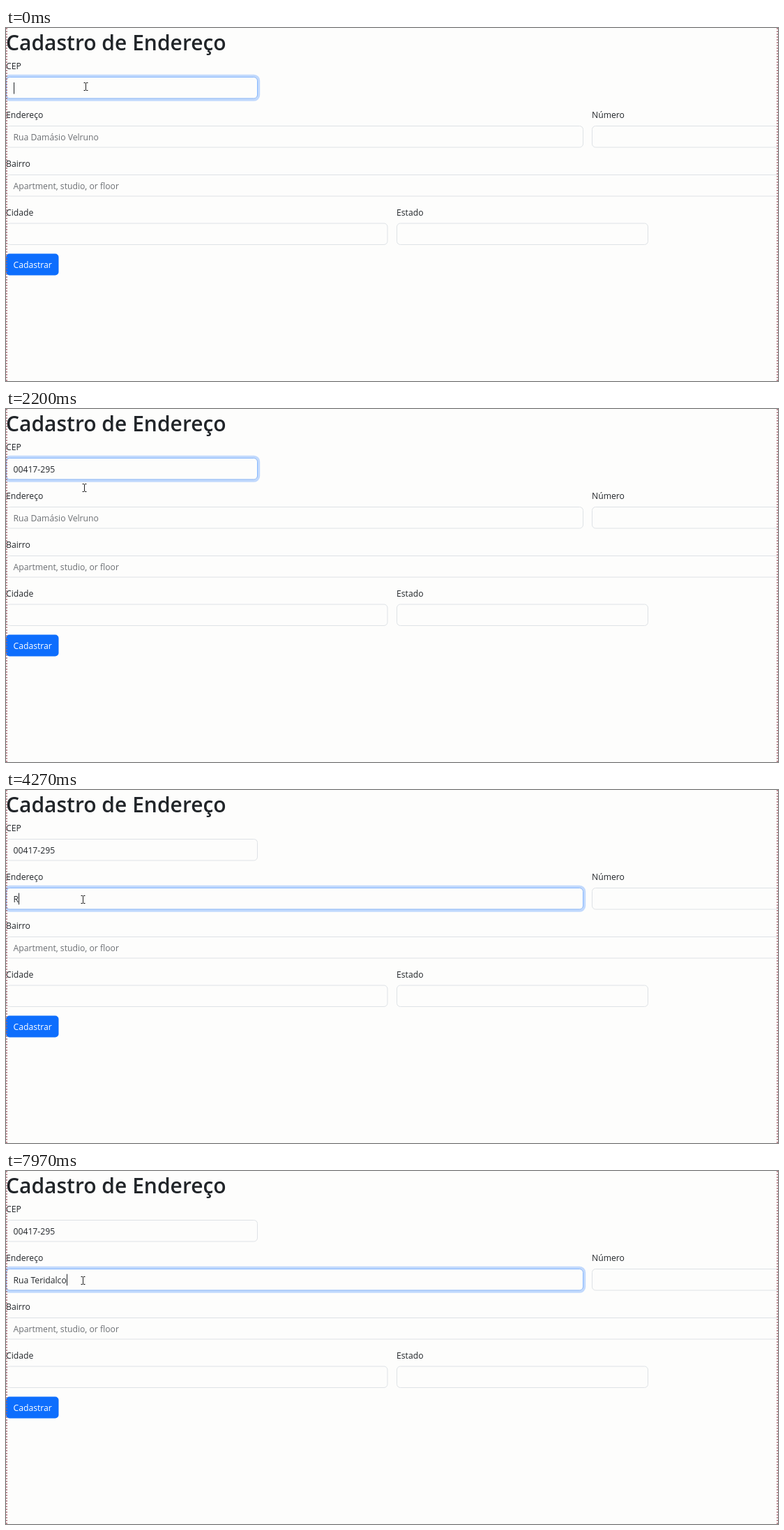
An HTML page that plays this animation: 1107 px wide and 506 px high, repeating every 8000 ms.

```html
<!DOCTYPE html>
<html lang="pt-BR">
<head>
<meta charset="utf-8">
<title>Cadastro de Endereço</title>
<style>
  html, body { margin: 0; width: 100%; height: 100%; overflow: hidden; background: #fdfdfc; }
  svg { display: block; }
  text { font: 12.2px "Open Sans", "Noto Sans", sans-serif; fill: #212529; white-space: pre; }
  .title { font-size: 30px; font-weight: 600; }
  .hint { fill: #6c6f73; }
  .field { fill: none; stroke: #dee2e6; }
  .focus { fill: none; stroke: #86b7fe; }
  .ring { fill: none; stroke: #0d6efd; stroke-opacity: .25; stroke-width: 3.2; }
  .edge { stroke: #a5606c; stroke-width: 1.4; stroke-dasharray: 2 2; }
</style>
</head>
<body>
<svg id="stage" width="1107" height="506" viewBox="0 0 1107 506"></svg>
<script>
const LOOP = 8000, CLICK = 2770, FADE = 150, BLINK = 500;
const stage = document.getElementById("stage");

function add(tag, attrs, parent = stage) {
  const el = document.createElementNS("http://www.w3.org/2000/svg", tag);
  for (const key in attrs) el.setAttribute(key, attrs[key]);
  return parent.appendChild(el);
}

function label(x, y, words, cls = "") {
  const el = add("text", { x, y, class: cls });
  el.textContent = words;
  return el;
}

function field(x, y, width, name) {
  label(x ? x - .5 : 0, y - 11.5, name);
  add("rect", { x: x || .5, y, width, height: 30.5, rx: 5, class: "field" });
}

function focusRing(y, width) {
  const group = add("g", {});
  add("rect", { x: -1.6, y: y - 2.1, width: width + 4.2, height: 34.7, rx: 7, class: "ring" }, group);
  add("rect", { x: .5, y, width, height: 30.5, rx: 5, class: "focus" }, group);
  return group;
}

label(0, 31.5, "Cadastro de Endereço", "title");
field(0, 70.5, 360, "CEP");
field(0, 140.5, 827, "Endereço");
field(840.5, 140.5, 273, "Número");
field(0, 210.5, 1113, "Bairro");
field(0, 280, 546.5, "Cidade");
field(560.5, 280, 360, "Estado");
label(10.5, 230.5, "Apartment, studio, or floor", "hint");

add("rect", { x: 0, y: 323.5, width: 75.5, height: 31, rx: 5, fill: "#0d6efd" });
label(10.5, 343.8, "Cadastrar").style.fill = "#fff";

const rings = [focusRing(70.5, 360), focusRing(140.5, 827)];
const hint = label(10.5, 160.5, "Rua Damásio Velruno", "hint");

// Each input types one character at each of its key times.
const inputs = [
  { text: "00417-295", y: 90.8, keys: [280, 420, 560, 700, 840, 990, 1130, 1270, 1410] },
  { text: "Rua Teridalco", y: 160.5,
    keys: [4150, 4280, 4410, 4560, 6080, 6280, 6480, 6680, 7000, 7200, 7400, 7600, 7830] }
];
for (const input of inputs) input.el = label(10.5, input.y, "");
const blinkStarts = [0, CLICK, 3250, ...inputs.flatMap(i => i.keys)];

const caret = add("rect", { width: 1, height: 16.5, fill: "#212529" });
const pointer = add("path", {
  d: "M-3 -5.5h2.5M.5 -5.5h2.5M0 -5v10M-3 5.5h2.5M.5 5.5h2.5",
  fill: "none", stroke: "#222"
});
for (const x of [1, 1106]) add("path", { d: `M${x} 0V506`, class: "edge" });

const clamp = v => Math.max(0, Math.min(1, v));
const ease = v => v * v * (3 - 2 * v);

function draw(t) {
  for (const { el, text, keys } of inputs)
    el.textContent = text.slice(0, keys.filter(k => k <= t).length);
  hint.style.display = inputs[1].el.textContent ? "none" : "";

  const shift = ease(clamp((t - CLICK) / FADE));
  rings[0].style.opacity = 1 - shift;
  rings[1].style.opacity = shift;

  const active = inputs[t < CLICK ? 0 : 1];
  const since = t - Math.max(...blinkStarts.filter(s => s <= t));
  const length = active.el.textContent ? active.el.getComputedTextLength() : 0;
  caret.setAttribute("x", Math.round(10.5 + length));
  caret.setAttribute("y", active.y - 12.8);
  caret.style.display = since % (2 * BLINK) < BLINK ? "" : "none";

  const move = ease(clamp((t - 1900) / 700));
  const x = Math.round(114 - 4 * move) + .5, y = Math.round(84 + 73 * move);
  pointer.setAttribute("transform", `translate(${x} ${y})`);
}

const start = performance.now();
function tick() {
  draw((performance.now() - start) % LOOP);
  requestAnimationFrame(tick);
}
tick();
</script>
</body>
</html>
```
